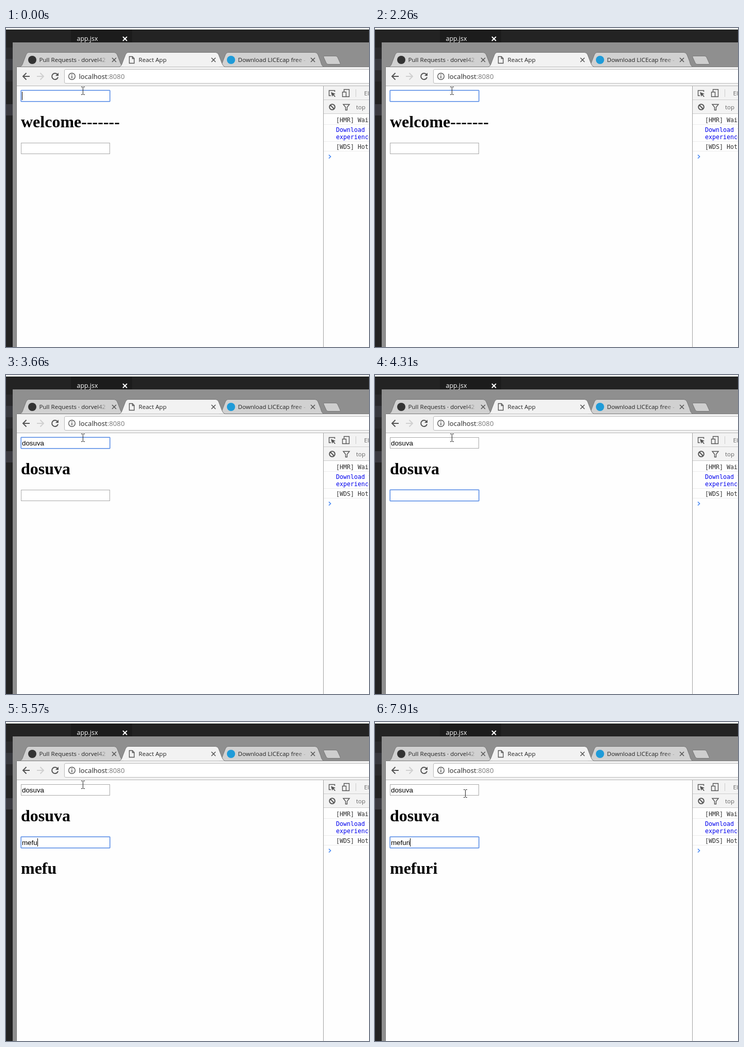
Recreate the animation shown at these times as an HTML page. Size 705x620 px, loop 8000 ms.

```html
<!DOCTYPE html>
<html lang="en">
<head>
<meta charset="utf-8">
<title>Two inputs</title>
<style>
  html, body { margin: 0; width: 100%; height: 100%; overflow: hidden; background: #222; }
  svg { display: block; width: 705px; height: 620px; }
  text { white-space: pre; }
  .ui { font: 11.6px "Open Sans", "Noto Sans", sans-serif; fill: #222; }
  .mono { font: 11.63px "DejaVu Sans Mono", monospace; fill: #303030; }
  .field { font: 13.333px "Liberation Sans", Arial, sans-serif; }
  .heading { font: bold 32px "Liberation Serif", "Times New Roman", serif; }
  .icon { fill: none; stroke: #555; stroke-width: 2; }
  .thin { stroke-width: 1.4; }
  .ring { fill: none; stroke: #9dbcf0; }
  .box { fill: #fff; stroke: #a9a9a9; }
  .focused .box { stroke: #5b8ee6; }
  .group:not(.focused) .ring { display: none; }
</style>
</head>
<body>
<svg viewBox="0 0 705 620">
  <defs>
    <linearGradient id="fade">
      <stop offset="0" stop-color="#d1d1d1" stop-opacity="0"/>
      <stop offset="1" stop-color="#d1d1d1"/>
    </linearGradient>
    <path id="cross" d="M-4 -4L4 4M4 -4L-4 4"/>
  </defs>

  <!-- editor behind the browser -->
  <rect width="705" height="620" fill="#232323"/>
  <rect width="705" height="3" fill="#f0f6f4"/>
  <rect x="126" y="3" width="119" height="25" fill="#1c1c1c"/>
  <rect y="38" width="13" height="66" fill="#2a2a2c"/>
  <rect y="60" width="13" height="22" fill="#38393e"/>
  <rect y="148" width="13" height="22" fill="#3a3a40"/>
  <text class="ui" x="137.5" y="25" style="font-size:12.4px;fill:#fff">app.jsx</text>
  <use href="#cross" x="231" y="21" fill="none" stroke="#fff" stroke-width="2"/>

  <!-- window frame and tabs -->
  <path d="M13 28H705V620H13Z" fill="#8f8f8f"/>
  <path d="M20.5 76V620" stroke="#777"/>
  <g stroke="#777">
    <path d="M27 75.5C31 74 32 71 34 65L39 52Q41 47.5 44 47.5H210Q214 47.5 216 52L221 65Q224 74 228 75.5Z" fill="#d1d1d1"/>
    <path d="M414 75.5C418 74 419 71 421 65L426 52Q428 47.5 431 47.5H600Q604 47.5 606 52L611 65Q613 74 617 75.5Z" fill="#d1d1d1"/>
    <path d="M618 54.5H640Q643 54.5 644 57L649 68Q650.500 70.500 648 70.500H626Q623 70.500 622 68L617 57Q616 54.500 618 54.500Z" fill="#cecece"/>
    <path d="M21 75.500H220C224 74 225 71 227 65L232 52Q234 47.500 237 47.500H407Q411 47.500 413 52L418 65Q421 74 425 75.500H705" fill="#f2f2f2"/>
  </g>
  <rect x="21" y="76" width="684" height="37" fill="#f2f2f2"/>
  <circle cx="51" cy="62" r="8" fill="#333"/>
  <circle cx="437" cy="62" r="8" fill="#1f9bd8"/>
  <path class="icon thin" d="M239.500 55.500H245.500L249 59V68.500H239.500ZM245.500 55.500V59.500H249" fill="#fff"/>
  <text class="ui" x="64.500" y="66">Pull Requests · dorvel42</text>
  <text class="ui" x="257.500" y="66">React App</text>
  <text class="ui" x="450.500" y="66">Download LICEcap free -</text>
  <rect x="176" y="52" width="22" height="20" fill="url(#fade)"/>
  <rect x="198" y="52" width="5" height="20" fill="#d1d1d1"/>
  <rect x="562" y="52" width="24" height="20" fill="url(#fade)"/>
  <g class="icon" style="stroke-width:1.600">
    <use href="#cross" x="210" y="62"/>
    <use href="#cross" x="403" y="62"/>
    <use href="#cross" x="596" y="62"/>
  </g>

  <!-- toolbar -->
  <path class="icon" d="M46 94H33.500M39.500 87.500L33 94L39.500 100.500"/>
  <path class="icon" d="M60 94H72.500M66.500 87.500L73 94L66.500 100.500" style="stroke:#d0d0d0"/>
  <path class="icon" d="M100 90.500A6 6 0 1 0 101 95.500"/>
  <path d="M102 87V93H96Z" fill="#555"/>
  <path d="M705 80.500H116Q113.500 80.500 113.500 83V105Q113.500 107.500 116 107.500H705" fill="#fff" stroke="#b9b9b9"/>
  <circle class="icon thin" cx="128" cy="94" r="6.300"/>
  <path class="icon" d="M128 90V91.800M128 93V97.800" style="stroke-width:1.600"/>
  <text class="ui" x="141.500" y="99" style="font-size:13.200px">localhost<tspan fill="#777">:8080</tspan></text>

  <!-- page -->
  <rect x="21" y="113" width="684" height="507" fill="#fefefe"/>
  <path d="M21 112.500H705" stroke="#b6b6b6"/>
  <g class="group">
    <rect class="ring" x="28.500" y="120.500" width="174" height="23" rx="1.500"/>
    <rect class="box" x="29.500" y="121.500" width="172" height="21"/>
    <text class="field" x="31" y="137"></text>
    <text class="heading" x="29" y="193"></text>
  </g>
  <g class="group" transform="translate(0 102)">
    <rect class="ring" x="28.500" y="120.500" width="174" height="23" rx="1.500"/>
    <rect class="box" x="29.500" y="121.500" width="172" height="21"/>
    <text class="field" x="31" y="137"></text>
    <text class="heading" x="29" y="193"></text>
  </g>
  <rect id="caret" width="1" height="16"/>

  <!-- developer tools -->
  <rect x="617" y="113" width="88" height="54" fill="#f3f3f3"/>
  <path d="M616.500 113V620" stroke="#a3a3a3"/>
  <path d="M617 139.500H705M617 166.500H705M679.500 119V134" stroke="#ccc"/>
  <path d="M617 187.500H705M617 220.500H705M617 239.500H705" stroke="#ececec"/>
  <path class="icon thin" d="M631 131.500H627.500V121.500H638.500V124"/>
  <path d="M631 124.500L640 128L636.500 129.500L640 133L638.500 134L635 130.500L633.500 133.500Z" fill="#555"/>
  <path class="icon thin" d="M656.500 124V119.500H666.500V133.500H660M653.500 124.500H660.500V133.500H653.500Z"/>
  <g class="icon">
    <circle cx="633.500" cy="153.500" r="5.300"/>
    <path d="M629.800 149.800L637.200 157.200"/>
  </g>
  <path class="icon thin" d="M655 148.500H667L662.500 154V159.500H659.500V154Z"/>
  <text class="ui" x="695.500" y="131" style="fill:#666">Elements</text>
  <text class="ui" x="680" y="158" style="fill:#666">top</text>
  <text class="mono" x="641" y="183">[HMR] Waiting</text>
  <text class="mono" x="641" y="202" style="fill:#00e">Download the</text>
  <text class="mono" x="641" y="216" style="fill:#00e">experience</text>
  <text class="mono" x="641" y="235">[WDS] Hot</text>
  <path class="icon" d="M627 246.500L630.500 250L627 253.500" style="stroke:#4285f4;stroke-width:1.600"/>

  <path id="pointer" d="M146 114.500H148.500L149.500 115.500L150.500 114.500H153M149.500 115V129M146 129.500H148.500L149.500 128.500L150.500 129.500H153" fill="none" stroke="#222"/>
</svg>
<script>
  const LOOP = 8000;
  const SWITCH = 3780;
  const MOVE = 7910;

  // Each track lists [start time, value].
  const first = [[0, ""], [2690, "d"], [2840, "dos"], [2980, "dosuv"], [3100, "dosuva"]];
  const second = [[0, ""], [5020, "m"], [5170, "me"], [5290, "mef"], [5570, "mefu"],
    [5690, "mefui"], [6000, "mefuir"], [6400, "mefui"], [6550, "mefu"],
    [6670, "mefur"], [6820, "mefuri"]];
  const blink = [[0, 1], [140, 0], [700, 1], [1100, 0], [1720, 1], [2260, 0], [2690, 1],
    [3660, 0], [3780, 1], [4310, 0], [4860, 1], [7350, 0], [7910, 1]];

  const valueAt = (track, time) => track.findLast(([start]) => start <= time)[1];
  const groups = [...document.querySelectorAll(".group")];
  const caret = document.getElementById("caret");
  const pointer = document.getElementById("pointer");

  function setText(node, text) {
    if (node.textContent !== text) node.textContent = text;
  }

  function draw(time) {
    const active = time < SWITCH ? 0 : 1;
    const values = [valueAt(first, time), valueAt(second, time)];
    const titles = [values[0] || "welcome-------", values[1]];

    groups.forEach((group, i) => {
      group.classList.toggle("focused", i === active);
      setText(group.querySelector(".field"), values[i]);
      setText(group.querySelector(".heading"), titles[i]);
    });

    const width = values[active]
      ? groups[active].querySelector(".field").getComputedTextLength() : 0;
    caret.setAttribute("x", 31 + Math.round(width));
    caret.setAttribute("y", 124 + 102 * active);
    caret.setAttribute("opacity", valueAt(blink, time));
    pointer.setAttribute("transform", time < MOVE ? "" : "translate(26 17)");
  }

  const origin = performance.now();
  function tick() {
    draw((performance.now() - origin) % LOOP);
    requestAnimationFrame(tick);
  }
  tick();
</script>
</body>
</html>
```
